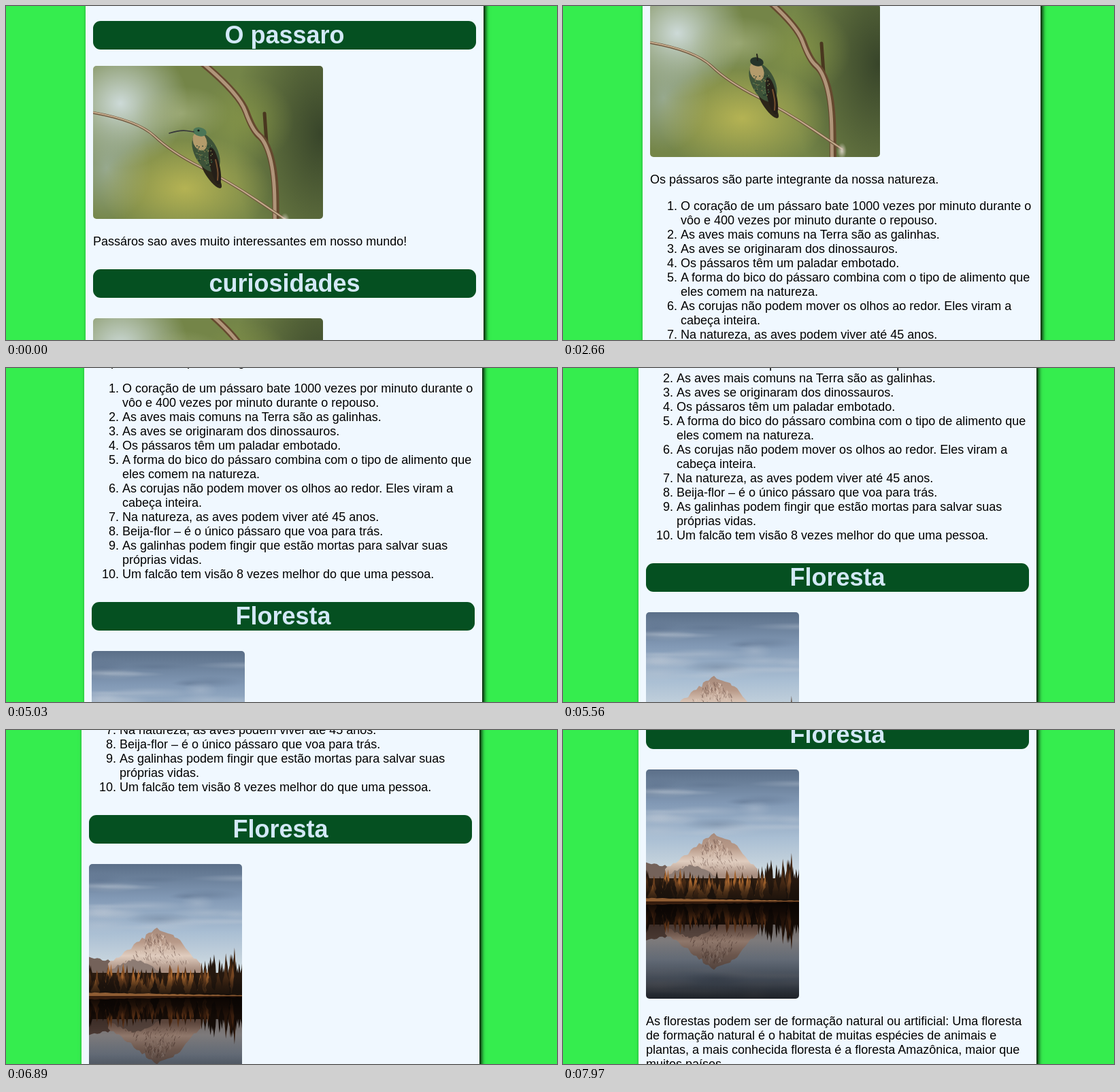
These frames come from a looping animation (810 by 491 pixels, 8000 ms). An HTML page with a canvas:

```html
<!DOCTYPE html>
<html lang="pt">
<head>
<meta charset="utf-8">
<title>O passaro</title>
<style>
html, body { margin: 0; width: 100%; height: 100%; overflow: hidden; }
#stage { position: relative; width: 100%; height: 100%; overflow: hidden; background: #35ed4e; }
#page {
  position: absolute; left: 117px; top: -100px; width: 563px; padding: 122px 11px 200px;
  background: #f0f8ff; box-shadow: 3px 3px 6px #000;
  font: 18px/21px Arial, "Liberation Sans", sans-serif; color: #000; white-space: nowrap;
}
h1, h2 {
  font-size: 36px; line-height: 42px; text-align: center;
  background: #055021; color: #d3e9f8; border-radius: 11px;
}
h1 { margin: 0 0 .67em; }
h2 { margin: .83em 0; }
p, ol { margin: 1em 0; }
ol { padding-left: 2.5em; }
canvas { display: block; margin-bottom: 23px; border-radius: 5px; }
</style>
</head>
<body>
<div id="stage">
<div id="page">
  <h1>O passaro</h1>
  <canvas id="bird1" width="338" height="225"></canvas>
  <p>Passáros sao aves muito interessantes em nosso mundo!</p>
  <h2>curiosidades</h2>
  <canvas id="bird2" width="338" height="225"></canvas>
  <p>Os pássaros são parte integrante da nossa natureza.</p>
  <ol>
    <li>O coração de um pássaro bate 1000 vezes por minuto durante o<br>vôo e 400 vezes por minuto durante o repouso.</li>
    <li>As aves mais comuns na Terra são as galinhas.</li>
    <li>As aves se originaram dos dinossauros.</li>
    <li>Os pássaros têm um paladar embotado.</li>
    <li>A forma do bico do pássaro combina com o tipo de alimento que<br>eles comem na natureza.</li>
    <li>As corujas não podem mover os olhos ao redor. Eles viram a<br>cabeça inteira.</li>
    <li>Na natureza, as aves podem viver até 45 anos.</li>
    <li>Beija-flor – é o único pássaro que voa para trás.</li>
    <li>As galinhas podem fingir que estão mortas para salvar suas<br>próprias vidas.</li>
    <li>Um falcão tem visão 8 vezes melhor do que uma pessoa.</li>
  </ol>
  <h2>Floresta</h2>
  <canvas id="lake" width="225" height="337"></canvas>
  <p>As florestas podem ser de formação natural ou artificial: Uma floresta<br>de formação natural é o habitat de muitas espécies de animais e<br>plantas, a mais conhecida floresta é a floresta Amazônica, maior que<br>muitos países.</p>
</div>
</div>
<script>
const page = document.getElementById('page');
const context = id => document.getElementById(id).getContext('2d');
const clamp = (v, lo, hi) => Math.min(hi, Math.max(lo, v));

function rng(seed) {
  return () => (seed = (seed * 16807) % 2147483647) / 2147483647;
}

function blob(c, x, y, rx, ry, color) {
  c.save();
  c.translate(x, y);
  c.scale(rx, ry);
  const g = c.createRadialGradient(0, 0, 0, 0, 0, 1);
  g.addColorStop(0, color);
  g.addColorStop(1, color.slice(0, 7) + '00');
  c.fillStyle = g;
  c.fillRect(-1, -1, 2, 2);
  c.restore();
}

function oval(c, x, y, rx, ry, turn, color) {
  c.beginPath();
  c.ellipse(x, y, rx, ry, turn, 0, Math.PI * 2);
  c.fillStyle = color;
  c.fill();
}

// Evenly spaced colours from y0 down to y1
function fade(c, y0, y1, ...colors) {
  const g = c.createLinearGradient(0, y0, 0, y1);
  colors.forEach((color, i) => g.addColorStop(i / (colors.length - 1), color));
  return g;
}

function stroke(c, pts, width, color) {
  c.beginPath();
  c.moveTo(...pts[0]);
  for (let i = 1; i < pts.length - 1; i++) {
    const [x, y] = pts[i], [nx, ny] = pts[i + 1];
    c.quadraticCurveTo(x, y, (x + nx) / 2, (y + ny) / 2);
  }
  c.lineTo(...pts[pts.length - 1]);
  c.lineWidth = width;
  c.strokeStyle = color;
  c.stroke();
}

function branch(c, pts, width, dark, light) {
  stroke(c, pts, width, dark);
  stroke(c, pts.map(([x, y]) => [x - width * .15, y - width * .15]), width * .5, light);
}

function drawBird(c, dy, front) {
  c.lineCap = c.lineJoin = 'round';
  c.fillStyle = '#748548';
  c.fillRect(0, 0, 338, 225);
  c.translate(0, dy);
  blob(c, 335, 100, 130, 230, '#38452a');
  blob(c, 40, 55, 100, 95, '#cddad8');
  blob(c, 20, 150, 65, 80, '#a0b2a0cc');
  blob(c, 130, 70, 70, 40, '#a9b583aa');
  blob(c, 135, 180, 125, 80, '#b9b654ee');
  blob(c, 225, 80, 70, 65, '#8b9a48aa');

  stroke(c, [[252, 70], [253, 85], [255, 112]], 5, '#49371f');
  branch(c, [[162, -3], [216, 42], [235, 95], [255, 112], [268, 160], [269, 242]], 10, '#65492f', '#b0957a');
  branch(c, [[-4, 68], [66, 80], [115, 127], [200, 170], [283, 226]], 4, '#6f563e', '#c5ac8d');
  blob(c, 282, 228, 7, 12, '#d4cfbf');

  oval(c, 174, 160, 24, 7, .95, '#2c2619');
  oval(c, 166, 127, 31, 17, 1.1, '#3d5238');
  oval(c, 157, 111, 14, 10, 1.2, '#b39b6b');
  oval(c, 179, 147, 28, 7, 1.35, '#251f18');
  stroke(c, [[180, 138], [184, 154], [183, 168]], 2, '#76502f');
  const r = rng(41);
  for (let i = 0; i < 50; i++) {
    c.fillStyle = ['#5f7c50', '#1e3a2e', '#8b8150'][i % 3];
    c.fillRect(151 + r() * 24, 116 + r() * 30, 1.5, 1.5);
  }
  oval(c, 157, 97, 10, 6.5, .2, front ? '#26342a' : '#4b7657');
  if (front) stroke(c, [[158, 95], [158, 91], [157, 86]], 2, '#26231e');
  else {
    stroke(c, [[112, 99], [128, 94], [148, 97]], 1.7, '#35363a');
    oval(c, 155, 95, 1.6, 1.6, 0, '#101510');
  }
}

const SHORE = 194;

// Rough skyline through a few key points
function ridge(c, pts, rough, fill, r) {
  c.beginPath();
  c.moveTo(pts[0][0], SHORE);
  for (let i = 1; i < pts.length; i++) {
    const [x0, y0] = pts[i - 1], [x1, y1] = pts[i];
    for (let x = x0; x < x1; x += 4)
      c.lineTo(x, y0 + (y1 - y0) * (x - x0) / (x1 - x0) + (r() - .5) * rough);
  }
  c.lineTo(...pts[pts.length - 1]);
  c.lineTo(pts[pts.length - 1][0], SHORE);
  c.fillStyle = fill;
  c.fill();
}

function spruce(c, x, top, base, half, r) {
  c.beginPath();
  c.moveTo(x, top);
  for (const side of [1, -1])
    for (let i = 1; i <= 7; i++) {
      const k = side > 0 ? i / 7 : (8 - i) / 7;
      c.lineTo(x + side * half * k * (.55 + r() * .6), top + (base - top) * k);
    }
  c.fill();
}

function drawShore(c) {
  const r = rng(17);
  c.fillStyle = fade(c, 0, 150, '#5b6f88', '#8299b5', '#a9bed3', '#ccd8df');
  c.fillRect(0, 0, 225, SHORE);
  for (let i = 0; i < 24; i++)
    blob(c, r() * 225, 12 + r() * 85, 25 + r() * 50, 4 + r() * 9, i % 4 ? '#c0cad655' : '#566a8555');

  ridge(c, [[0, 138], [30, 142], [60, 152]], 3, '#74625a', r);
  ridge(c, [[28, 147], [62, 124], [84, 106], [100, 96], [126, 105], [142, 124], [164, 146]], 6,
    fade(c, 95, 155, '#a88b7c', '#b89a89', '#e0cdbf', '#a98f81'), r);
  for (let i = 0; i < 170; i++) {
    const y = 102 + r() * 42, x = 100 + (r() - .5) * (y - 94) * 1.9;
    stroke(c, [[x, y], [x + (r() - .3) * 5, y + 2 + r() * 5]], 1, i % 2 ? '#6f554c88' : '#e6d2c488');
  }
  ridge(c, [[30, 155], [64, 140], [78, 144], [108, 160]], 4, '#8d7c74', r);

  c.fillStyle = '#2c1c10';
  c.fillRect(0, 160, 225, SHORE - 160);
  const tones = ['#a5652e', '#754521', '#472a15', '#25180f'];
  for (let i = 0; i < 130; i++) {
    const x = r() * 231 - 3, right = clamp((x - 150) / 50, 0, 1);
    const top = 142 - right * 20 + i * .2 + r() * 12;
    c.fillStyle = tones[clamp(Math.floor(r() * 4 + right * 1.3), 0, 3)];
    spruce(c, x, top, SHORE - 4, 6 + r() * 2, r);
  }
  c.fillStyle = fade(c, 165, SHORE, '#160f0a00', '#160f0a99', '#160f0aee');
  c.fillRect(0, 165, 225, SHORE - 165);
  ridge(c, [[0, SHORE - 5], [110, SHORE - 3], [225, SHORE - 1]], 1, '#8f5d33', r);
}

function drawLake(c) {
  c.save();
  c.translate(0, SHORE * 2);
  c.scale(1, -1);
  drawShore(c);
  c.restore();
  c.globalCompositeOperation = 'multiply';
  c.fillStyle = fade(c, SHORE, 337, '#5f4c42', '#7b6c66', '#a4958f', '#8f8b8c', '#6a686a', '#3c3938');
  c.fillRect(0, SHORE, 225, 143);
  c.globalCompositeOperation = 'source-over';
  c.beginPath();
  c.rect(0, 0, 225, SHORE);
  c.clip();
  drawShore(c);
}

drawBird(context('bird1'), 0, false);
drawBird(context('bird2'), -12, true);
drawLake(context('lake'));

const LOOP = 8000, STEP = 65, SLACK = 10, NOTCH = 719 / 7;
// Wheel turns: start, end, notches
const turns = [[1180, 1440, 2], [1720, 1840, 1], [2190, 2390, 1], [2590, 3070, 2], [3330, 3540, 1]];
// Slow glide: step number, distance
const keys = [[-1, 0], [8, 64], [20, 145], [36, 308], [44, 365]];

// Index of the latest of n steps spread from a to b, -1 before the first
const stepAt = (t, a, b, n) => clamp(Math.floor((t - a + SLACK) * (n - 1) / (b - a)), -1, n - 1);

function turned(t, [a, b, notches]) {
  const n = Math.round((b - a) / STEP) + 1;
  return (stepAt(t, a, b, n) + 1) / n * notches * NOTCH;
}

function glided(k) {
  const i = Math.max(1, keys.findIndex(key => k <= key[0]));
  const [k0, y0] = keys[i - 1], [k1, y1] = keys[i];
  return y0 + (y1 - y0) * (k - k0) / (k1 - k0);
}

const start = performance.now();
function frame() {
  const t = (performance.now() - start) % LOOP;
  const k = stepAt(t, 5030, 7970, 45);
  const y = turns.reduce((sum, turn) => sum + turned(t, turn), glided(k));
  const x = Math.min(6, (k + 1) * 2);
  page.style.transform = `translate(${-x}px, ${-Math.round(y)}px)`;
  requestAnimationFrame(frame);
}
frame();
</script>
</body>
</html>
```
